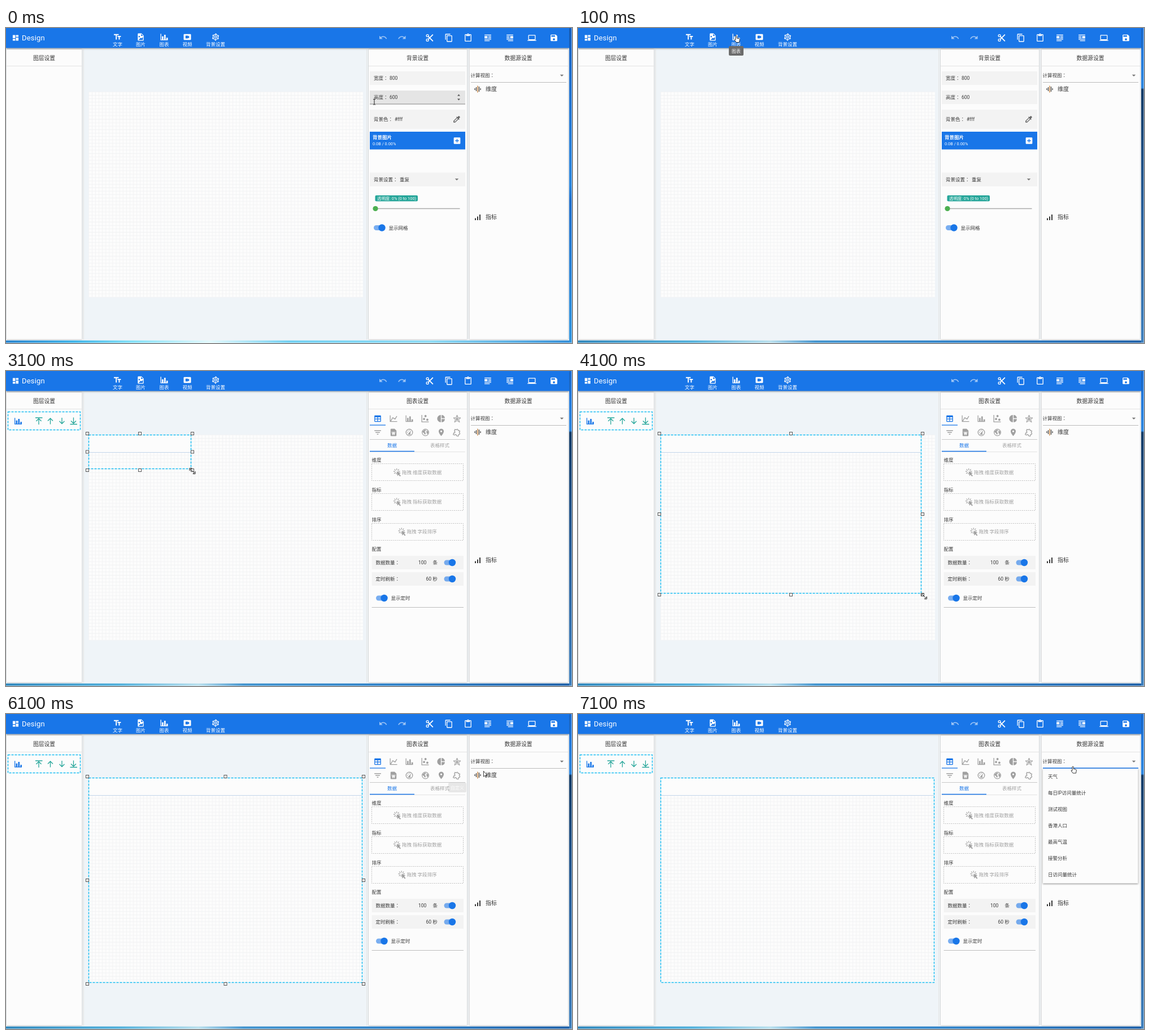
An HTML page for the animation above (8 s loop, 1002 px wide and 559 px high).

```html
<!DOCTYPE html>
<html lang="zh-CN">
<head>
<meta charset="utf-8">
<title>Design</title>
<style>
html, body { margin: 0; width: 100%; height: 100%; overflow: hidden; background: #f1f4f6; }
svg { position: absolute; left: 0; top: 0; fill: currentColor; color: #383838;
  font: 8.5px Roboto, "Noto Sans CJK SC", "Noto Sans CJK", sans-serif; }
text { white-space: pre; }
.i { transform: scale(.65) translate(-12px, -12px); stroke-width: 2; }
.line { fill: none; stroke: currentColor; }
.mid { text-anchor: middle; }
.title { font-size: 9.8px; text-anchor: middle; }
.big { font-size: 10px; }
.small { font-size: 7.4px; }
/* Full-width colon centred in its cell */
.label { font-family: Roboto, "Noto Sans CJK TC", "Noto Sans CJK", sans-serif; font-feature-settings: "locl" 0; }
.white { color: #fff; }
.dim { opacity: .58; }
.gray { color: #a0a0a0; }
.blue { color: #1976e8; }
.teal { color: #26a69a; }
.rule { fill: none; stroke: #e4e4e4; }
.field { fill: #f3f3f3; }
.dash { fill: none; stroke: #18bdf2; stroke-width: 1.5; stroke-dasharray: 4 2; }
.drop { fill: none; stroke: #c2c2c2; stroke-dasharray: 2 1.5; }
.panel { fill: #fcfcfc; filter: drop-shadow(0 .6px 1px #0005); }
.tip { fill: #6c6c6c; }
.cursor { fill: #fff; stroke: #222; stroke-width: .9; stroke-linejoin: round; }

/* Time windows of the 8 s loop */
.w { visibility: hidden; animation: 8s step-end infinite; }
.field-hover { animation-name: field-hover; }
.open { animation-name: open; }
.chart-hover { animation-name: chart-hover; }
.page { animation-name: page; }
.chart { animation-name: chart; }
.line-chart { animation-name: line-chart; }
.table { animation-name: table; }
.reach { animation-name: reach; }
.grips { animation-name: grips; }
.grab { animation-name: grab; }
.pull { animation-name: pull; }
.release { animation-name: release; }
.leave { animation-name: leave; }
.menu { animation-name: menu; }
@keyframes field-hover { 0% { visibility: visible } 1.25% { visibility: hidden } }
@keyframes open { 1.25% { visibility: visible } }
@keyframes chart-hover { 1.25% { visibility: visible } 13.75% { visibility: hidden } }
@keyframes page { 0% { visibility: visible } 13.75% { visibility: hidden } }
@keyframes chart { 13.75% { visibility: visible } }
@keyframes line-chart { 13.75% { visibility: visible } 26.25% { visibility: hidden } }
@keyframes table { 26.25% { visibility: visible } }
@keyframes reach { 26.25% { visibility: visible } 38.75% { visibility: hidden } }
@keyframes grips { 38.75% { visibility: visible } 88.75% { visibility: hidden } }
@keyframes grab { 38.75% { visibility: visible } 51.25% { visibility: hidden } }
@keyframes pull { 51.25% { visibility: visible } 63.75% { visibility: hidden } }
@keyframes release { 63.75% { visibility: visible } 76.25% { visibility: hidden } }
@keyframes leave { 76.25% { visibility: visible } 88.75% { visibility: hidden } }
@keyframes menu { 88.75% { visibility: visible } }

.selection { left: 144px; top: 111px; width: 186px; height: 65px; overflow: visible;
  animation: resize 8s step-end infinite; }
@keyframes resize {
  0% { width: 186px; height: 65px }
  51.25% { width: 466px; height: 286px }
  63.75% { width: 489px; height: 368px }
}
.frame { animation: frame 8s step-end infinite; }
@keyframes frame {
  0% { width: 181px; height: 60px }
  51.25% { width: 461px; height: 281px }
  63.75% { width: 484px; height: 363px }
}
.head { height: 31px !important; }
.head-line { height: 1px !important; }
</style>
</head>
<body>
<svg width="1002" height="559">
  <defs>
    <linearGradient id="floor0">
      <stop stop-color="#2583cf"/><stop offset=".12" stop-color="#3bb4ea"/><stop offset=".22" stop-color="#7fe0f8"/>
      <stop offset=".36" stop-color="#e2fafd"/><stop offset=".5" stop-color="#6fd0f3"/><stop offset=".75" stop-color="#8bdcf6"/><stop offset="1" stop-color="#2e8cd8"/>
    </linearGradient>
    <linearGradient id="floor1">
      <stop stop-color="#2d87bd"/><stop offset=".2" stop-color="#4fb0dc"/><stop offset=".34" stop-color="#b9e0ee"/>
      <stop offset=".42" stop-color="#3f93cf"/><stop offset=".7" stop-color="#2b7fc8"/><stop offset="1" stop-color="#1c5fa8"/>
    </linearGradient>
    <linearGradient id="side0" x2="0" y2="1">
      <stop stop-color="#1763c6"/><stop offset=".5" stop-color="#2a86de"/><stop offset=".55" stop-color="#1d6dcb"/><stop offset="1" stop-color="#2f95e0"/>
    </linearGradient>
    <linearGradient id="side1" x2="0" y2="1">
      <stop stop-color="#1b6fd8"/><stop offset=".19" stop-color="#2b86e0"/><stop offset=".195" stop-color="#123a66"/>
      <stop offset=".6" stop-color="#265f9c"/><stop offset="1" stop-color="#3d7fbd"/>
    </linearGradient>

    <path id="board" d="M3 13h8V3H3zm0 8h8v-6H3zm10 0h8V11h-8zm0-18v6h8V3z" style="transform:scale(.56) translate(-12px,-12px)"/>
    <path id="type" class="i" d="M2 4v3h5v12h3V7h5V4zm19 5h-9v3h3v7h3v-7h3z"/>
    <path id="image" class="i" fill-rule="evenodd" d="M6 2h8l6 6v12a2 2 0 0 1-2 2H6a2 2 0 0 1-2-2V4a2 2 0 0 1 2-2zm7 1.5V9h5.5zM6 20h12v-8l-4 4-2-2zM8 9a2 2 0 0 0 0 4 2 2 0 0 0 0-4z"/>
    <path id="bars" class="i" d="M22 21H2V3h2v16h2v-9h4v9h2V6h4v13h2v-5h4z"/>
    <path id="video" class="i" fill-rule="evenodd" d="M4 4h16a2 2 0 0 1 2 2v12a2 2 0 0 1-2 2H4a2 2 0 0 1-2-2V6a2 2 0 0 1 2-2zm3 4v8h7v-2.500l3 2.500V8l-3 2.500V8z"/>
    <g id="gear" class="i"><g class="line"><circle cx="12" cy="12" r="6.800"/><circle cx="12" cy="12" r="2.800"/><circle cx="12" cy="12" r="8.600" pathLength="18" stroke-dasharray="1.300 1.700" stroke-dashoffset="2.150"/></g></g>
    <path id="undo" class="i" d="M12.500 8c-2.650 0-5.050 1-6.900 2.600L2 7v9h9l-3.600-3.600c1.400-1.200 3.100-1.900 5.100-1.900 3.500 0 6.500 2.300 7.600 5.500l2.400-.8C21 11 17.100 8 12.500 8z"/>
    <g id="cut" class="i"><g class="line"><circle cx="6" cy="6" r="3"/><circle cx="6" cy="18" r="3"/><path d="M8 8l13 13M8 16L21 3" stroke-width="2.800"/></g></g>
    <path id="copy" class="i" d="M16 1H4a2 2 0 0 0-2 2v14h2V3h12zm3 4H8a2 2 0 0 0-2 2v14a2 2 0 0 0 2 2h11a2 2 0 0 0 2-2V7a2 2 0 0 0-2-2zm0 16H8V7h11z" fill-rule="evenodd"/>
    <path id="paste" class="i" fill-rule="evenodd" d="M19 2h-4.200a3 3 0 0 0-5.600 0H5a2 2 0 0 0-2 2v16a2 2 0 0 0 2 2h14a2 2 0 0 0 2-2V4a2 2 0 0 0-2-2zm-7 0a1 1 0 0 1 0 2 1 1 0 0 1 0-2zm7 18H5V4h2v3h10V4h2z"/>
    <path id="wrap" class="i" d="M3 3h18v2H3zm0 4h8v6H3zm10 0h8v2h-8zm0 4h8v2h-8zM3 15h18v2H3zm0 4h14v2H3z"/>
    <path id="laptop" class="i" fill-rule="evenodd" d="M20 18a2 2 0 0 0 2-2V6a2 2 0 0 0-2-2H4a2 2 0 0 0-2 2v10a2 2 0 0 0 2 2H0v2h24v-2zM4 6h16v10H4z"/>
    <path id="save" class="i" fill-rule="evenodd" d="M17 3H5a2 2 0 0 0-2 2v14a2 2 0 0 0 2 2h14a2 2 0 0 0 2-2V7zm-5 16a3 3 0 0 1 0-6 3 3 0 0 1 0 6zm3-10H5V5h10z"/>
    <path id="picker" class="i" fill-rule="evenodd" d="M20.700 5.600l-2.300-2.300a1 1 0 0 0-1.400 0l-3.200 3.100L12 4.500l-1.400 1.400 1.400 1.400-9 9V21h4.700l9-8.900 1.400 1.400 1.400-1.400-1.900-1.900 3.100-3.100a1 1 0 0 0 0-1.500zM6.900 19L5 17.100 13 9l2 1.900z"/>
    <path id="plus" class="i" fill-rule="evenodd" d="M19 3H5a2 2 0 0 0-2 2v14a2 2 0 0 0 2 2h14a2 2 0 0 0 2-2V5a2 2 0 0 0-2-2zm-2 10h-4v4h-2v-4H7v-2h4V7h2v4h4z"/>
    <path id="caret" class="i" d="M7 10l5 5 5-5z"/>
    <path id="grid" class="i" fill-rule="evenodd" d="M5 3h14a2 2 0 0 1 2 2v14a2 2 0 0 1-2 2H5a2 2 0 0 1-2-2V5a2 2 0 0 1 2-2zm0 5v4h6V8zm8 0v4h6V8zm-8 6v5h6v-5zm8 0v5h6v-5z"/>
    <path id="trend" class="i" d="M16 11.800l4.200-7.300 1.800 1-5.300 9-6.500-3.700L5.500 19H22v2H2V3h2v14.500L9.500 8z"/>
    <path id="dots" class="i" d="M2 2h2v18h18v2H2zM9 10a3 3 0 0 1 0 6 3 3 0 0 1 0-6zm4-8a3 3 0 0 1 0 6 3 3 0 0 1 0-6zm5 10a3 3 0 0 1 0 6 3 3 0 0 1 0-6z"/>
    <path id="pie" class="i" d="M11 2v20a10 10 0 0 1 0-20zm2 0v9h9a10 10 0 0 0-9-9zm0 11v9a10 10 0 0 0 9-9z"/>
    <g id="radar" class="i"><path class="line" stroke-width="1.400" d="M12 2l3 7 7 1-5 5 2 7-7-4-7 4 2-7-5-5 7-1zM12 2v16M2 10l15 5M22 10L7 15M5 22l10-13M19 22L9 9"/></g>
    <path id="filter" class="i" d="M3 6h18v2H3zm3 5h12v2H6zm4 5h4v2h-4z"/>
    <path id="word" class="i" fill-rule="evenodd" d="M6 2h9l5 5v13a2 2 0 0 1-2 2H6a2 2 0 0 1-2-2V4a2 2 0 0 1 2-2zm1 8l2 9h2l1-5 1 5h2l2-9h-2l-1 5-1-5h-2l-1 5-1-5z"/>
    <g id="gauge" class="i"><circle class="line" cx="12" cy="12" r="9"/><path d="M10 14l7-7-3 9a2.500 2.500 0 0 1-4-2zM6 11h2v2H6zm2-4h2v2H8zm4-2h2v2h-2zm-4 11h8v2H8z"/></g>
    <g id="globe" class="i"><circle class="line" cx="12" cy="12" r="9"/><path d="M5 8l7-4 1 4-4 2 4 3-2 6-3-5-4-3zM15 6l5 4-1 7-4-3z"/></g>
    <path id="pin" class="i" fill-rule="evenodd" d="M12 2a7 7 0 0 0-7 7c0 5.200 7 13 7 13s7-7.800 7-13a7 7 0 0 0-7-7zm0 4.500a2.500 2.500 0 0 1 0 5 2.500 2.500 0 0 1 0-5z"/>
    <g id="puzzle" class="i"><path class="line" d="M4 6h4a2.500 2.500 0 0 1 5 0h5v5a2.500 2.500 0 0 1 0 5v5h-5a2.500 2.500 0 0 0-5 0H4v-5a2.500 2.500 0 0 0 0-5z" transform="rotate(18 12 12)"/></g>
    <g id="click" class="i"><path d="M10 9l11 5-4 2 4 5-2 2-4-5-3 4z"/><path class="line" stroke-width="1.800" d="M10 1v5M4 3l3 4M1 9h5M3 15l4-3M16 3l-3 4M14 9h5M9 13v4"/></g>
    <path id="up" class="line" stroke-width="1.300" d="M0 6V-4.500M-4.500 0L0-4.500 4.500 0"/>
    <g id="toggle" class="blue"><rect x="-14.500" y="-4.500" width="18" height="9" rx="4.500" opacity=".58"/><circle r="6.200"/></g>
    <path id="hand" class="cursor" d="M2.500 8V1.200a1.200 1.200 0 0 1 2.200 0V5l4 .8q1.200.4 1.100 1.700L9 12.500H3.700L.6 8.300q.2-1.500 1.900-.3z"/>
    <path id="arrow" class="cursor" d="M.4.4v9.800l2.300-2.100 1.600 3.500 1.400-.6-1.600-3.500h3z"/>
    <g id="stretch" stroke="#222"><path d="M-5-5h4l-4 4zM5 5H1l4-4z" fill="#fff"/><path d="M-3-3l6 6"/></g>
    <rect id="grip" x="-2.500" y="-2.500" width="5" height="5" fill="#fff" stroke="#555"/>
  </defs>

  <!-- Workspace -->
  <rect x="137" y="36" width="503" height="518" fill="#eff4f8"/>
  <path class="rule" d="M137.500 38V553M638.500 38V553"/>
  <rect x="146" y="113" width="486" height="365" fill="#fcfcfc"/>
  <g fill="none" stroke="#f1f2f3">
    <path d="M146 295.500H632" stroke-width="365" stroke-dasharray=".8 5.275"/>
    <path d="M389 113V478" stroke-width="486" stroke-dasharray=".8 5.275"/>
  </g>
  <g class="panel">
    <rect x="1" y="38" width="133.500" height="514.500" rx="1"/>
    <rect x="642" y="38" width="174" height="514.500" rx="1"/>
    <rect x="820.500" y="38" width="174.500" height="514.500" rx="1"/>
  </g>
  <path class="rule" d="M1 67.500H134M642 67.500H816M821 67.500H995"/>

  <!-- Desktop edges -->
  <g class="w field-hover">
    <rect y="554.500" width="1002" height="4.500" fill="url(#floor0)"/>
    <rect x="997" width="5" height="559" fill="url(#side0)"/>
  </g>
  <g class="w open">
    <rect y="554.500" width="1002" height="4.500" fill="url(#floor1)"/>
    <rect x="997" width="5" height="559" fill="url(#side1)"/>
  </g>
  <path d="M0 558.500H1001.500V0" fill="none" stroke="#fff" opacity=".5"/>

  <!-- Top bar -->
  <rect width="997" height="35.500" fill="#1976e8" style="filter:drop-shadow(0 1px 1.500px #0006)"/>
  <g class="white">
    <use href="#board" x="17" y="17.500"/>
    <text x="28" y="21.500" style="font-size:13px;letter-spacing:.2px">Design</text>
    <use href="#type" x="197.500" y="16"/><use href="#image" x="238.500" y="16"/><use href="#bars" x="280" y="16"/>
    <use href="#video" x="321" y="16"/><use href="#gear" x="371" y="16"/>
    <g class="mid">
      <text x="197.500" y="32.300">文字</text><text x="238.500" y="32.300">图片</text><text x="280" y="32.300">图表</text>
      <text x="321" y="32.300">视频</text><text x="371" y="32.300">背景设置</text>
    </g>
    <g class="dim"><use href="#undo" x="667.500" y="17"/><use href="#undo" transform="translate(701 17) scale(-1 1)"/></g>
    <use href="#cut" x="750" y="17.500"/><use href="#copy" x="784" y="17.500"/><use href="#paste" x="818" y="17.500"/>
    <use href="#wrap" x="853" y="17.500"/><use href="#wrap" transform="translate(892 17.500) scale(-1 1)"/>
    <use href="#laptop" x="931" y="17.500"/><use href="#save" x="970" y="17.500"/>
  </g>

  <!-- Layers -->
  <text class="title" x="67.500" y="57">图层设置</text>
  <g class="w chart">
    <rect class="dash" x="3.500" y="72.500" width="128" height="32"/>
    <use class="blue" href="#bars" x="21.500" y="89"/>
    <g class="teal">
      <use href="#up" x="58" y="89"/><path class="line" stroke-width="1.300" d="M52 83H64.500M113.500 94.500H126"/>
      <use href="#up" x="78.500" y="88.500"/>
      <use href="#up" transform="translate(99 89) scale(1 -1)"/><use href="#up" transform="translate(119.500 88.500) scale(1 -1)"/>
    </g>
  </g>

  <!-- Data source -->
  <text class="title" x="907" y="57">数据源设置</text>
  <text class="label" x="822.500" y="87.200">计算视图：</text>
  <use href="#caret" x="984" y="84" color="#777"/>
  <path d="M823 96.500H992" stroke="#bbb"/>
  <path fill="none" stroke="#444" stroke-width="1.300" d="M830 107v3M832.500 105v7M837.500 104v9M840 107v3"/>
  <path stroke="#c98a4b" stroke-width="1.500" d="M835 102.500v12"/>
  <text class="big" x="849" y="112">维度</text>
  <path d="M830 337.500h2v3.500h-2zM834 334.500h2v6.500h-2zM838 331h2v10h-2z"/>
  <text class="big" x="849" y="339.200">指标</text>

  <!-- Background settings -->
  <g class="w page">
    <text class="title" x="728.500" y="57">背景设置</text>
    <g class="field">
      <rect x="644" y="77" width="169" height="24"/><rect x="644" y="111" width="169" height="24"/>
      <rect x="644" y="145" width="169" height="34"/><rect x="644" y="256.500" width="169" height="24.500"/>
    </g>
    <g class="w field-hover">
      <rect x="644" y="111" width="169" height="24" fill="#e5e5e5"/>
      <path d="M644 135H813" stroke="#858585"/>
      <path d="M799 120.500l2.500-3 2.500 3zM799 125.500l2.500 3 2.500-3z" fill="#555"/>
    </g>
    <g class="label">
      <text x="651" y="91.800">宽度：</text><text x="651" y="125.800">高度：</text>
      <text x="651" y="164.800">背景色：</text><text x="651" y="271.800">背景设置：</text>
    </g>
    <text x="679" y="91.800">800</text><text x="679" y="125.800">600</text>
    <text x="688" y="164.800">#fff</text><text x="697" y="271.800">重复</text>
    <use href="#picker" x="798" y="162" color="#666"/>
    <rect x="644" y="184" width="169" height="31.500" fill="#1976e8"/>
    <g class="white">
      <text x="649" y="196.800" font-weight="700">背景图片</text>
      <text class="small" x="649" y="207.500">0.0B / 0.00%</text>
      <use href="#plus" x="798.500" y="200"/>
    </g>
    <use href="#caret" x="798" y="268.500" color="#777"/>
    <rect x="653.500" y="297" width="75.500" height="10.500" rx="2" fill="#26a69a"/>
    <text class="white small" x="657" y="305">透明度: 0% (0 to 100)</text>
    <path d="M654 320.500H803.500" stroke="#aaa" stroke-width="1.300"/>
    <circle cx="654" cy="320.500" r="4.600" fill="#4caf50"/>
    <use href="#toggle" x="665.500" y="354.500"/>
    <text x="677.500" y="357.800">显示网格</text>
  </g>

  <!-- Chart settings -->
  <g class="w chart">
    <text class="title" x="728.500" y="57">图表设置</text>
    <g class="w line-chart">
      <rect x="644" y="72" width="28" height="24" fill="#efefef"/>
      <use class="gray" href="#grid" x="658" y="84.500"/>
      <use class="blue" href="#trend" x="686" y="84.500"/>
      <path d="M672 96H700" stroke="#1976e8" stroke-width="1.300"/>
      <text class="mid gray" x="768" y="135">图表样式</text>
    </g>
    <g class="w table">
      <use class="blue" href="#grid" x="658" y="84.500"/>
      <use class="gray" href="#trend" x="686" y="84.500"/>
      <path d="M644 96H672" stroke="#1976e8" stroke-width="1.300"/>
      <text class="mid gray" x="768" y="135">表格样式</text>
    </g>
    <g class="gray">
      <use href="#bars" x="714" y="84.500"/><use href="#dots" x="742" y="84.500"/><use href="#pie" x="770.500" y="84.500"/><use href="#radar" x="798.500" y="84.500"/>
      <use href="#filter" x="658" y="109"/><use href="#word" x="686" y="109"/><use href="#gauge" x="714" y="109"/>
      <use href="#globe" x="742.500" y="109"/><use href="#pin" x="770.500" y="109"/><use href="#puzzle" x="798.500" y="109"/>
    </g>
    <path d="M644 121.500H813" stroke="#c8c8c8"/>
    <path class="rule" d="M644 143.500H813"/>
    <path d="M644 142.500H723" stroke="#1976e8" stroke-width="1.500"/>
    <text class="mid blue" x="683.500" y="135">数据</text>
    <text x="647.500" y="161">维度</text><text x="647.500" y="213.800">指标</text>
    <text x="647.500" y="266.600">排序</text><text x="647.500" y="319.200">配置</text>
    <g class="drop">
      <rect x="647.500" y="164.500" width="162" height="30"/><rect x="647.500" y="217.500" width="162" height="30"/><rect x="647.500" y="270.500" width="162" height="30"/>
    </g>
    <g class="gray">
      <use href="#click" x="693" y="180"/><text x="701" y="182.500">拖拽 <tspan font-weight="500">维度</tspan>获取数据</text>
      <use href="#click" x="693" y="232.500"/><text x="701" y="235.300">拖拽 <tspan font-weight="500">指标</tspan>获取数据</text>
      <use href="#click" x="701.500" y="285.500"/><text x="709.500" y="288.200">拖拽 <tspan font-weight="500">字段</tspan>排序</text>
    </g>
    <g class="field"><rect x="647.500" y="328" width="162.500" height="24"/><rect x="647.500" y="357" width="162.500" height="24"/></g>
    <text class="label" x="654.500" y="342.800">数据数量：</text><text x="730" y="342.800">100</text><text x="755.500" y="342.800">条</text>
    <text class="label" x="654.500" y="371.800">定时刷新：</text><text x="743.500" y="371.800">60 秒</text>
    <use href="#toggle" x="790" y="340"/><use href="#toggle" x="790" y="369"/><use href="#toggle" x="669.500" y="403"/>
    <text x="681.500" y="405.800">显示定时</text>
    <path d="M647.500 419.500H810" stroke="#bdbdbd"/>
  </g>
</svg>

<svg class="selection">
  <rect class="w line-chart" x="2.500" y="2.500" width="181" height="60" fill="#fcfcfc"/>
  <g class="w table">
    <rect class="frame head" x="2.500" y="2.500" fill="#fcfcfc"/>
    <rect class="frame head-line" x="2.500" y="33" fill="#c3d5ea"/>
  </g>
  <g class="w chart"><rect class="dash frame" x="2.500" y="2.500"/></g>
  <g class="w grips">
    <use href="#grip"/><use href="#grip" x="50%"/><use href="#grip" x="100%"/>
    <use href="#grip" y="50%"/><use href="#grip" x="100%" y="50%"/>
    <use href="#grip" y="100%"/><use href="#grip" x="50%" y="100%"/><use href="#grip" x="100%" y="100%"/>
  </g>
</svg>

<svg width="1002" height="559">
  <!-- Tooltips -->
  <g class="w chart-hover">
    <rect class="tip" x="267" y="32" width="26" height="17" rx="2"/>
    <text class="white mid" x="280" y="43.500" style="font-size:8px">图表</text>
  </g>
  <g class="w line-chart">
    <rect class="tip" x="645" y="105" width="26" height="17.500" rx="2"/>
    <text class="white mid" x="658" y="116.700" style="font-size:8px">表格</text>
  </g>
  <g class="w leave" opacity=".14">
    <rect class="tip" x="783" y="122" width="32" height="17" rx="2"/>
    <text class="white mid" x="799" y="133.500" style="font-size:8px">自定义</text>
  </g>

  <!-- View list -->
  <g class="w menu">
    <rect x="823" y="97" width="168.500" height="203.500" fill="#fcfcfc" style="filter:drop-shadow(0 1px 1.500px #0007)"/>
    <path d="M823 96H992" stroke="#1976e8" stroke-width="1.500"/>
    <text x="832" y="113.500">天气</text>
    <text x="832" y="142.700">每日IP访问量统计</text>
    <text x="832" y="171.800">测试视图</text>
    <text x="832" y="201">香港人口</text>
    <text x="832" y="230.200">最高气温</text>
    <text x="832" y="259.300">接警分析</text>
    <text x="832" y="288.400">日访问量统计</text>
  </g>

  <!-- Pointer -->
  <path class="w field-hover" fill="none" stroke="#222" d="M650 126.500h1.500l.5.500.5-.5H654M652 127v8.500M650 136h1.500l.5-.5.5.5H654"/>
  <use class="w chart-hover" href="#hand" x="276.500" y="13"/>
  <use class="w line-chart" href="#hand" x="659" y="75"/>
  <use class="w reach" href="#arrow" x="328" y="171"/>
  <use class="w grab" href="#stretch" x="330" y="177.500"/>
  <use class="w pull" href="#stretch" x="612.500" y="399.500"/>
  <use class="w release" href="#arrow" x="638" y="490"/>
  <use class="w leave" href="#arrow" x="845" y="101"/>
  <use class="w menu" href="#hand" x="872.500" y="92.500"/>
</svg>
</body>
</html>
```
